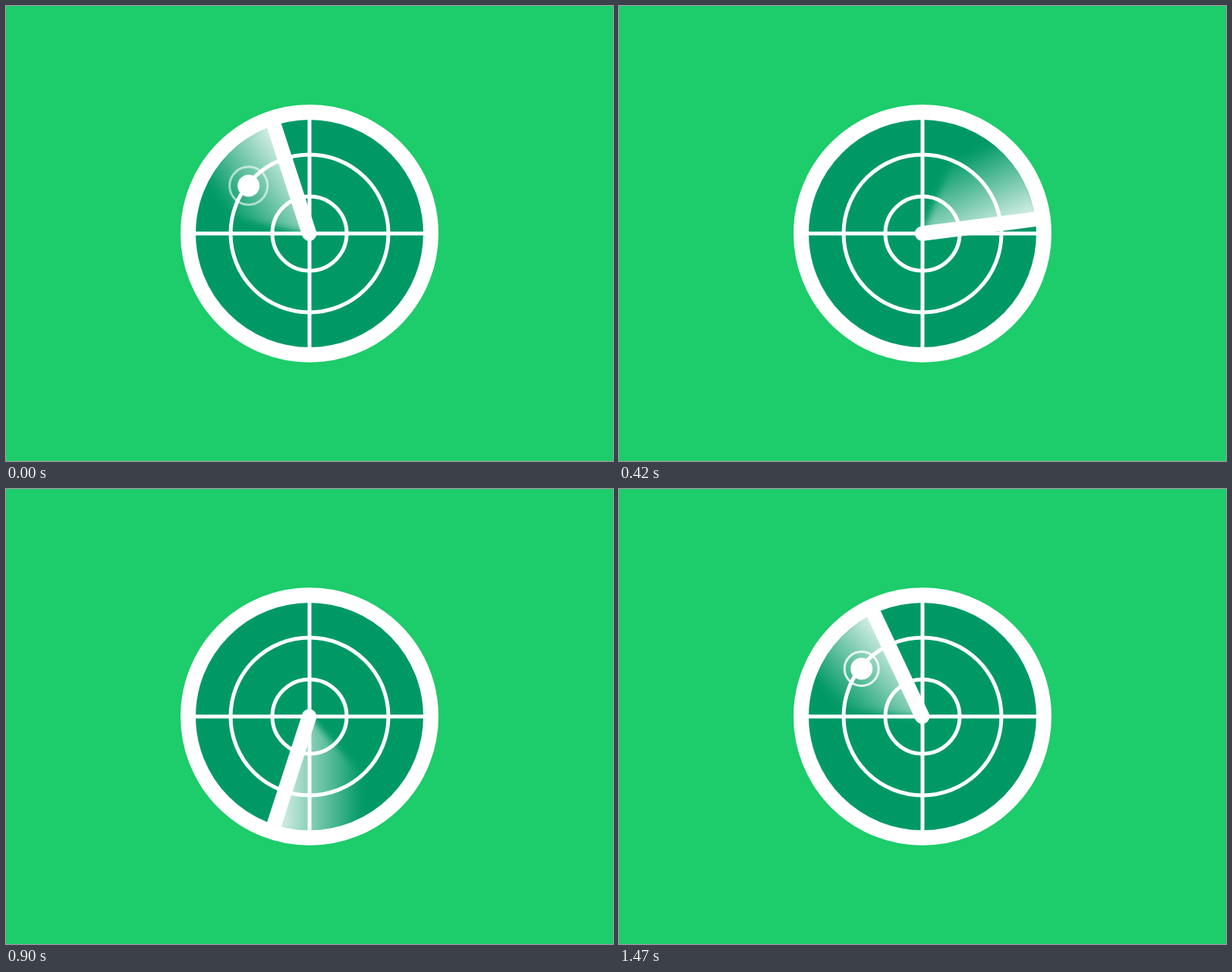
Write an HTML page that moves like this. It is 800 px wide and 600 px high and loops after 1.5 s.

```html
<!DOCTYPE html>
<html lang="en">
<head>
<meta charset="utf-8">
<title>Radar</title>
<style>
  html, body { margin: 0; width: 100%; height: 100%; overflow: hidden; background: #1dcc6a; }
  svg { display: block; width: 100%; height: 100%; }
</style>
</head>
<body>
<svg viewBox="0 0 800 600" xmlns="http://www.w3.org/2000/svg">
  <defs>
    <clipPath id="dial"><circle cx="400" cy="300" r="151"/></clipPath>
    <linearGradient id="fade" gradientUnits="userSpaceOnUse" x1="43.7" y1="-14.2" x2="-67" y2="21.8">
      <stop offset="0" stop-color="#fff" stop-opacity=".9"/>
      <stop offset="1" stop-color="#fff" stop-opacity="0"/>
    </linearGradient>
    <filter id="soft" filterUnits="userSpaceOnUse" x="-200" y="-200" width="400" height="400"
            color-interpolation-filters="sRGB">
      <feGaussianBlur stdDeviation="4"/>
    </filter>
  </defs>

  <rect width="800" height="600" fill="#1dcc6a"/>
  <circle cx="400" cy="300" r="160" fill="#009966"/>
  <g clip-path="url(#dial)">
    <g class="sweep">
      <path d="M0 0V-156A156 156 0 0 0 -135.1 -78Z" fill="url(#fade)" filter="url(#soft)"/>
    </g>
  </g>

  <g fill="none" stroke="#fff" stroke-width="5">
    <path d="M250 300H550M400 150V450"/>
    <circle cx="400" cy="300" r="49"/>
    <circle cx="400" cy="300" r="104"/>
  </g>
  <g id="blips"></g>
  <g class="sweep">
    <path d="M0 0V-158" stroke="#fff" stroke-width="19.5" stroke-linecap="round"/>
  </g>
  <circle cx="400" cy="300" r="160" fill="none" stroke="#fff" stroke-width="20"/>
</svg>

<script>
const LOOP = 1500, STEP = 30, DOT = 14.5, FADE = 200;
const sweeps = document.querySelectorAll('.sweep');
const layer = document.getElementById('blips');

// ping: when the ring leaves the dot; out: when the dot starts to fade
const blips = [
  { x: 319.7, y: 237, ping: 1374, out: 1550 },
  { x: 508.5, y: 334.8, ping: 642, out: 654 },
  { x: 348.7, y: 373, ping: 1080, out: 1130 }
];

const clamp = v => Math.max(0, Math.min(1, v));

function addCircle(blip, attrs) {
  const el = document.createElementNS('http://www.w3.org/2000/svg', 'circle');
  setAttrs(el, { cx: blip.x, cy: blip.y, ...attrs });
  return layer.appendChild(el);
}

function setAttrs(el, attrs) {
  for (const key in attrs) el.setAttribute(key, attrs[key]);
}

for (const b of blips) {
  b.dot = addCircle(b, { fill: '#fff' });
  b.ring = addCircle(b, { fill: 'none', stroke: '#fff', 'stroke-width': 3 });
}

function drawBlip(b, time) {
  const begin = b.ping - 90;
  const t = time < begin ? time + LOOP : time;
  const age = t - b.ping;
  const pop = 1 - (1 - clamp((t - begin) / 90)) ** 2;
  setAttrs(b.dot, { r: DOT * pop, opacity: 1 - clamp((t - b.out) / FADE) });
  setAttrs(b.ring, {
    r: DOT + Math.max(0, age) / 12,
    opacity: age < 0 ? 0 : 1 - clamp((age - 75) / 120)
  });
}

function draw(time) {
  const angle = time / LOOP * 360 - 18;
  for (const s of sweeps) s.setAttribute('transform', `translate(399.6 300) rotate(${angle})`);
  for (const b of blips) drawBlip(b, time);
}

const start = performance.now();
function tick() {
  const t = (performance.now() - start) % LOOP;
  draw(Math.floor(t / STEP) * STEP);
  requestAnimationFrame(tick);
}
draw(0);
requestAnimationFrame(tick);
</script>
</body>
</html>
```
